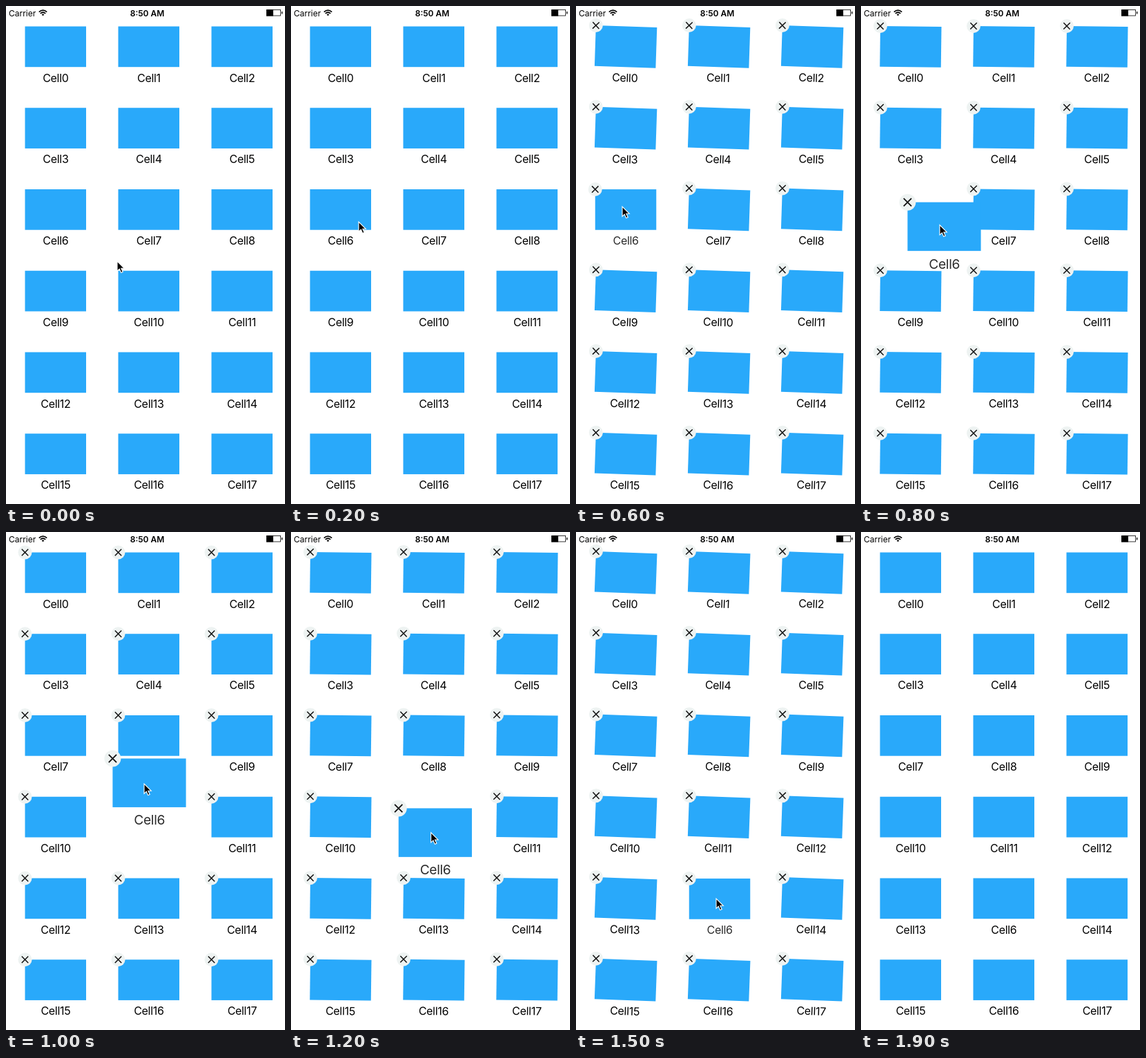
Animation, 404 px wide and 720 px high, one loop 2 s. Source, as an HTML page:

```html
<!DOCTYPE html>
<html lang="en">
<head>
<meta charset="utf-8">
<title>Reorderable grid</title>
<style>
  html, body { margin: 0; width: 100%; height: 100%; overflow: hidden; background: #fff; }
  svg { display: block; width: 404px; height: 720px; }
  text { font-family: Inter, Roboto, sans-serif; fill: #000; }
  .label { font-size: 16px; letter-spacing: -.3px; text-anchor: middle; }
  .status { font-size: 12px; }
  .clock { font-weight: 600; text-anchor: middle; }
  .tile { fill: #29a9fa; }
  .badge circle { fill: #eef3f2; }
  .badge path { fill: none; stroke: #111; stroke-width: 1.5; }
  .held .label { fill: #2b2b2b; }
</style>
</head>
<body>
<svg viewBox="0 0 404 720">
  <text class="status" x="4" y="14.5">Carrier</text>
  <g fill="none" stroke="#000" stroke-width="1.8">
    <path d="M47.8 8.6Q53.5 3.6 59.2 8.6M49.8 10.9Q53.5 7.7 57.2 10.9"/>
    <path d="M51.6 12.2Q53.5 10.6 55.4 12.2L53.5 14.2Z" fill="#000" stroke="none"/>
  </g>
  <text class="status clock" x="204.5" y="14.5">8:50 AM</text>
  <rect x="377.5" y="5.5" width="20" height="8.5" fill="none" stroke="#000" stroke-width=".8"/>
  <path d="M377 5h10v9.5h-10ZM399 8h1.3v3.5h-1.3Z"/>
  <g id="grid"></g>
  <path id="cursor" d="M0 0V14.2L3.3 11.2L5.7 16.6L8.2 15.5L5.8 10.3H10.3Z"
        fill="#000" stroke="#fff" stroke-width="1.1"/>
</svg>
<script>
const LOOP = 2000, STEP = 100, COUNT = 18, HELD = 6;
const TILE = { w: 88.5, h: 58.7 };
const EDIT = { from: 300, to: 1800 };
const DRAG = { from: 600, to: 1600 };

// Keys: time, x, y
const cursorPath = [
  [0, 161, 369], [100, 150, 359], [200, 98, 312], [300, 77, 289], [400, 75, 288],
  [600, 67, 290], [700, 71, 293], [1000, 200, 364], [1300, 204, 470], [1500, 203, 530]
];
// Keys: time, centre x, centre y, scale
const dragPath = [
  [600, 72, 294.4, 1], [700, 77, 297, 1.2], [1000, 207.5, 362.7, 1.2],
  [1300, 209.5, 470.6, 1.2], [1400, 209, 508, 1.2], [1500, 208, 530.4, 1]
];

const grid = document.getElementById('grid');
const cursor = document.getElementById('cursor');

function along(keys, t) {
  const next = keys.findIndex(key => key[0] > t);
  if (next < 0) return keys[keys.length - 1].slice(1);
  if (next === 0) return keys[0].slice(1);
  const a = keys[next - 1], b = keys[next];
  const p = (t - a[0]) / (b[0] - a[0]);
  return a.slice(1).map((v, i) => v + (b[i + 1] - v) * p);
}

const smooth = (t, from, to) => {
  const p = Math.min(1, Math.max(0, (t - from) / (to - from)));
  return p * p * (3 - 2 * p);
};

const home = slot => [27.5 + 135 * (slot % 3), 29.5 + 117.75 * Math.floor(slot / 3)];

function slotOf(i, heldSlot) {
  if (i === HELD) return heldSlot;
  return i > HELD && i <= heldSlot ? i - 1 : i;
}

function position(i, t) {
  const [a, b, c] = [6, 10, 13].map(slot => home(slotOf(i, slot)));
  const first = smooth(t, 800, 1000), second = smooth(t, 1300, 1500);
  return a.map((v, k) => v + (b[k] - v) * first + (c[k] - b[k]) * second);
}

function tilt(i, t) {
  if (t < EDIT.from || t >= EDIT.to) return 0;
  if (i === HELD && t < DRAG.to) return -2.6 * (1 - smooth(t, 400, 600));
  return 1.05 * (1 + Math.cos(2 * Math.PI * (t - 500) / 1000));
}

const cells = Array.from({ length: COUNT }, (_, i) => {
  const cell = document.createElementNS('http://www.w3.org/2000/svg', 'g');
  cell.innerHTML = `
    <rect class="tile" width="${TILE.w}" height="${TILE.h}"/>
    <text class="label" x="44.4" y="80">Cell${i}</text>
    <g class="badge"><circle r="10"/><path d="M-4.7-4.7L4.7 4.7M4.7-4.7L-4.7 4.7"/></g>`;
  return cell;
});
// The dragged cell stays above the others.
grid.append(...cells.filter((_, i) => i !== HELD), cells[HELD]);
const badges = cells.map(cell => cell.querySelector('.badge'));

function draw(t) {
  const editing = t >= EDIT.from && t < EDIT.to;
  const dragging = t >= DRAG.from && t < DRAG.to;
  cells.forEach((cell, i) => {
    let [x, y] = position(i, t), scale = 1;
    if (i === HELD && dragging) {
      const [cx, cy, s] = along(dragPath, t);
      scale = s;
      x = cx - TILE.w / 2 * s;
      y = cy - TILE.h / 2 * s;
    }
    cell.setAttribute('transform',
      `translate(${x} ${y}) scale(${scale}) rotate(${tilt(i, t)} 44.4 40)`);
    badges[i].style.display = editing ? '' : 'none';
  });
  cells[HELD].classList.toggle('held', dragging);
  const [x, y] = along(cursorPath, t);
  cursor.setAttribute('transform', `translate(${x} ${y})`);
  cursor.style.display = t < EDIT.to ? '' : 'none';
}

const start = performance.now();
function tick() {
  const t = (performance.now() - start) % LOOP;
  draw(Math.floor(t / STEP) * STEP);
  requestAnimationFrame(tick);
}
tick();
</script>
</body>
</html>
```
